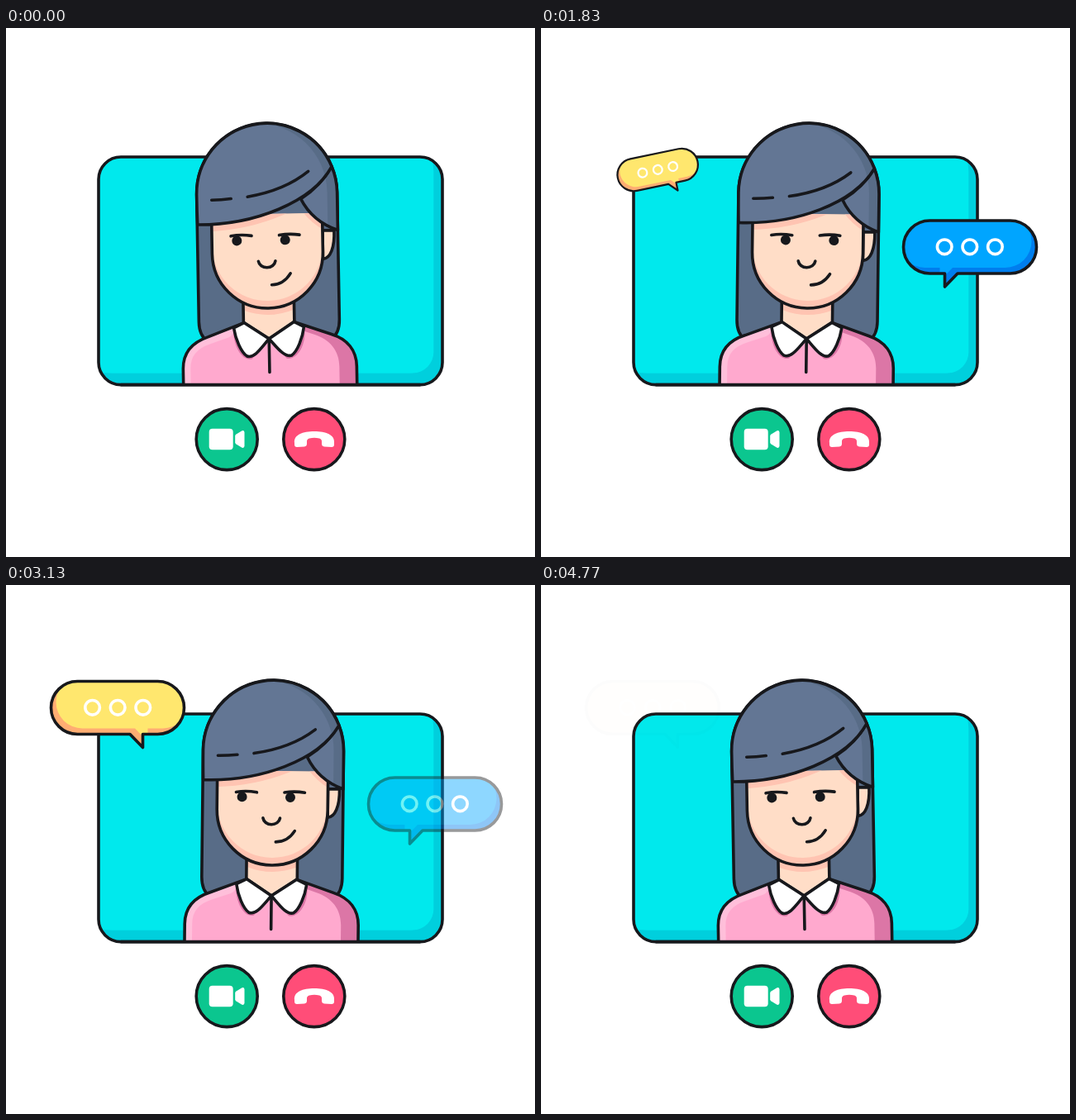
An HTML page with a canvas that plays this animation: 640x640 px, repeating every 4810 ms.

```html
<!DOCTYPE html>
<html lang="en">
<head>
<meta charset="utf-8">
<title>Video call</title>
<style>
html, body { margin: 0; width: 100%; height: 100%; overflow: hidden; background: #fff; }
canvas { display: block; width: 640px; height: 640px; }
</style>
</head>
<body>
<canvas id="stage" width="640" height="640"></canvas>
<script>
const LOOP = 4810;
const INK = '#17181c';
const stage = document.getElementById('stage').getContext('2d');
const layer = document.createElement('canvas');
layer.width = layer.height = 640;
const layerCtx = layer.getContext('2d');

const clamp = v => Math.min(1, Math.max(0, v));
const ramp = (t, from, to) => clamp((t - from) / (to - from));
const ease = u => u * u * (3 - 2 * u);
const mix = (a, b, u) => a + (b - a) * u;
const rad = deg => deg * Math.PI / 180;

function roundRect(x, y, w, h, r) {
  const p = new Path2D();
  p.roundRect(x, y, w, h, r);
  return p;
}
function circle(x, y, r) {
  const p = new Path2D();
  p.arc(x, y, r, 0, 2 * Math.PI);
  return p;
}
function fill(c, path, color, dx = 0, dy = 0) {
  c.save();
  c.translate(dx, dy);
  c.fillStyle = color;
  c.fill(path);
  c.restore();
}
function line(c, path, color = INK, width = 3.6) {
  c.strokeStyle = color;
  c.lineWidth = width;
  c.lineCap = c.lineJoin = 'round';
  c.stroke(path);
}
function clipped(c, path, draw) {
  c.save();
  c.clip(path);
  draw();
  c.restore();
}
// Shadow colour first, then the same shape shifted in the light colour.
function shaded(c, path, dark, light, dx, dy) {
  clipped(c, path, () => {
    fill(c, path, dark);
    fill(c, path, light, dx, dy);
  });
}

const screen = roundRect(112, 156, 416, 275.6, 27);
const aboveEdge = new Path2D('M0 0H640V431H0Z');
const bottomEdge = new Path2D('M139 431.6H501');

const hair = new Path2D('M246 378Q235.5 371 235.5 354V200A85 85 0 0 1 405.5 200V354Q405.5 371 395 378Z');
const cap = new Path2D('M236 236.5Q235.5 220 235.5 200A85 85 0 0 1 399.5 169C375 212 305 238 236 236.5Z');
const lock = new Path2D('M361.5 207.5Q375 235 405.5 246V200A85 85 0 0 0 399.5 169Q386 192 361.5 207.5Z');
const strands = new Path2D('M253.5 207Q265 207 277 205.7M297 203.8Q342 197 371 174.3');

const neck = new Path2D('M289.5 325V357L320 377L351 357V325Z');
const neckShade = new Path2D('M289.5 325V341Q320 353 351 341V325Z');
const body = new Path2D('M215.5 440V411C215.5 391 226 379 246 372.5L290 356L320 376L350.5 356L395 371.5C415 378 425.5 392 425.5 411V440Z');
const bodyLeft = new Path2D('M215.5 440V411C215.5 391 226 379 246 372.5L268 365');
const collar = new Path2D('M290 356L277.5 362C279.5 376 286 392 293 396.5C302 400 311 386 320 376C329 386 338 399 347 396.5C354 392 360.5 376 362.5 362L350.5 356L320 376Z');
const collarShade = new Path2D('M277 362C276 386 288 403 299 400L320 376L341 400C352 403 366 386 363 362Z');
const placket = new Path2D('M320 376V416.5');

const face = new Path2D('M253 225V272A67 67 0 0 0 387 272V225Z');
const faceLine = new Path2D('M253 237V272A67 67 0 0 0 387 272V237');
const ear = new Path2D('M387 280.5C396 280 401.5 267 401 246H387Z');
const brows = new Path2D('M276 251Q288 248.8 301 251M334.5 250.8Q347 248.8 359 250.8');
const nose = new Path2D('M308.8 282A10.4 9 0 0 0 329.4 282');
const mouth = new Path2D('M324.5 310.8Q339 310.5 347.3 297.3');

const camera = roundRect(245.7, 484.8, 29, 25.5, 4);
const lens = new Path2D('M277.2 493.5Q277.2 492.5 278.5 491.5L285.5 487.2Q288.5 486.5 288.5 489.5V505.5Q288.5 508.5 285.5 507.8L278.5 503.5Q277.2 502.5 277.2 501.5Z');
const phone = new Path2D('M349 502C348 492 359 488 373 488S398 492 397 502V504Q397 507 394 507L385 506.5Q382 506 382 503V500Q382 497.5 379 496.5Q373 494.8 367 496.5Q364 497.5 364 500V503Q364 506 361 506.5L352 507Q349 507 349 504Z');

// Speech bubble around its tail tip, body leaning right.
const bubble = new Path2D('M0 0V-16H-18A32 32 0 0 1 -18 -80H79A32 32 0 0 1 79 -16H15.5Z');

const blue = { x: 488.5, y: 313, side: 1, start: 0, fade: [2480, 3640], light: '#00a5ff', dark: '#007eee' };
const yellow = { x: 165.5, y: 196.5, side: -1, start: 1520, fade: [3390, 4780], light: '#ffe76e', dark: '#ffad72' };

function drawScreen() {
  shaded(stage, screen, '#00cfdd', '#00e9ed', -11, -14);
  fill(stage, new Path2D('M114 183H180V417H114Z'), '#00e9ed');
  fill(stage, roundRect(113.8, 157.8, 403.5, 259.5, [25, 16, 25, 4]), '#00e9ed');
  line(stage, screen);
}

function drawHead(look) {
  const c = stage;
  fill(c, ear, '#ffddc7');
  line(c, ear);
  shaded(c, face, '#ffc4b2', '#ffddc7', 0, -9);
  clipped(c, face, () => {
    line(c, cap, '#ffc4b2', 17);
    line(c, lock, '#ffc4b2', 13);
  });
  line(c, faceLine);
  line(c, brows);
  fill(c, circle(288.2 + look, 256.7, 6), INK);
  fill(c, circle(346.6 + look, 256.7, 6), INK);
  line(c, nose);
  line(c, mouth);
  for (const part of [lock, cap]) {
    clipped(c, part, () => {
      fill(c, part, '#586c87');
      fill(c, hair, '#637694', -12, 0);
    });
    line(c, part);
  }
  line(c, strands);
}

function drawPerson(t) {
  const c = stage;
  const tilt = -1.02 * Math.cos(2 * Math.PI * (t - 30) / LOOP);
  const look = 5 * (2 * ease(ramp(t, 300, 800)) - 1 - 2 * ease(ramp(t, 2480, 2980)));
  c.save();
  c.clip(aboveEdge);
  c.translate(320, 475);
  c.rotate(rad(tilt));
  c.translate(-320, -475);

  fill(c, hair, '#586c87');
  line(c, hair);
  fill(c, neck, '#ffddc7');
  fill(c, neckShade, '#ffc4b2');
  line(c, neck);
  shaded(c, body, '#dc76a6', '#ffa9ce', -21, 0);
  clipped(c, body, () => {
    line(c, bodyLeft, '#ffbfda', 18);
    fill(c, collarShade, '#dc76a6');
  });
  line(c, body);
  fill(c, collar, '#fff');
  line(c, collar);
  line(c, placket);
  drawHead(look);
  c.restore();
  line(c, bottomEdge);
}

function drawButtons() {
  const left = circle(267.2, 497.6, 37);
  const right = circle(372.8, 497.6, 37);
  fill(stage, left, '#0bc68f');
  fill(stage, right, '#ff4d78');
  line(stage, left);
  line(stage, right);
  [camera, lens, phone].forEach(icon => fill(stage, icon, '#fff'));
}

// Pops up from the tail with a swing that overshoots and settles.
function drawBubble(b, t) {
  const age = t - b.start;
  const grow = ease(ramp(age, 0, 540));
  const alpha = 1 - ramp(t, ...b.fade);
  if (grow < 0.002 || alpha <= 0) return;
  let swing = mix(40, -6, grow);
  swing = mix(swing, 2.8, ease(ramp(age, 540, 880)));
  swing = mix(swing, 0, ease(ramp(age, 880, 1100)));

  const c = layerCtx;
  c.clearRect(0, 0, 640, 640);
  c.save();
  c.translate(b.x, b.y);
  c.scale(b.side * grow, grow);
  c.rotate(rad(swing));
  shaded(c, bubble, b.dark, b.light, -6, -7);
  line(c, bubble);
  for (const i of [-1, 0, 1]) line(c, circle(30.3 + 30.6 * i, -48.2, 8.8), '#fff', 3.6);
  c.restore();

  stage.globalAlpha = alpha;
  stage.drawImage(layer, 0, 0);
  stage.globalAlpha = 1;
}

function frame() {
  const t = performance.now() % LOOP;
  stage.fillStyle = '#fff';
  stage.fillRect(0, 0, 640, 640);
  drawScreen();
  drawPerson(t);
  drawButtons();
  drawBubble(blue, t);
  drawBubble(yellow, t);
  requestAnimationFrame(frame);
}
frame();
</script>
</body>
</html>
```
